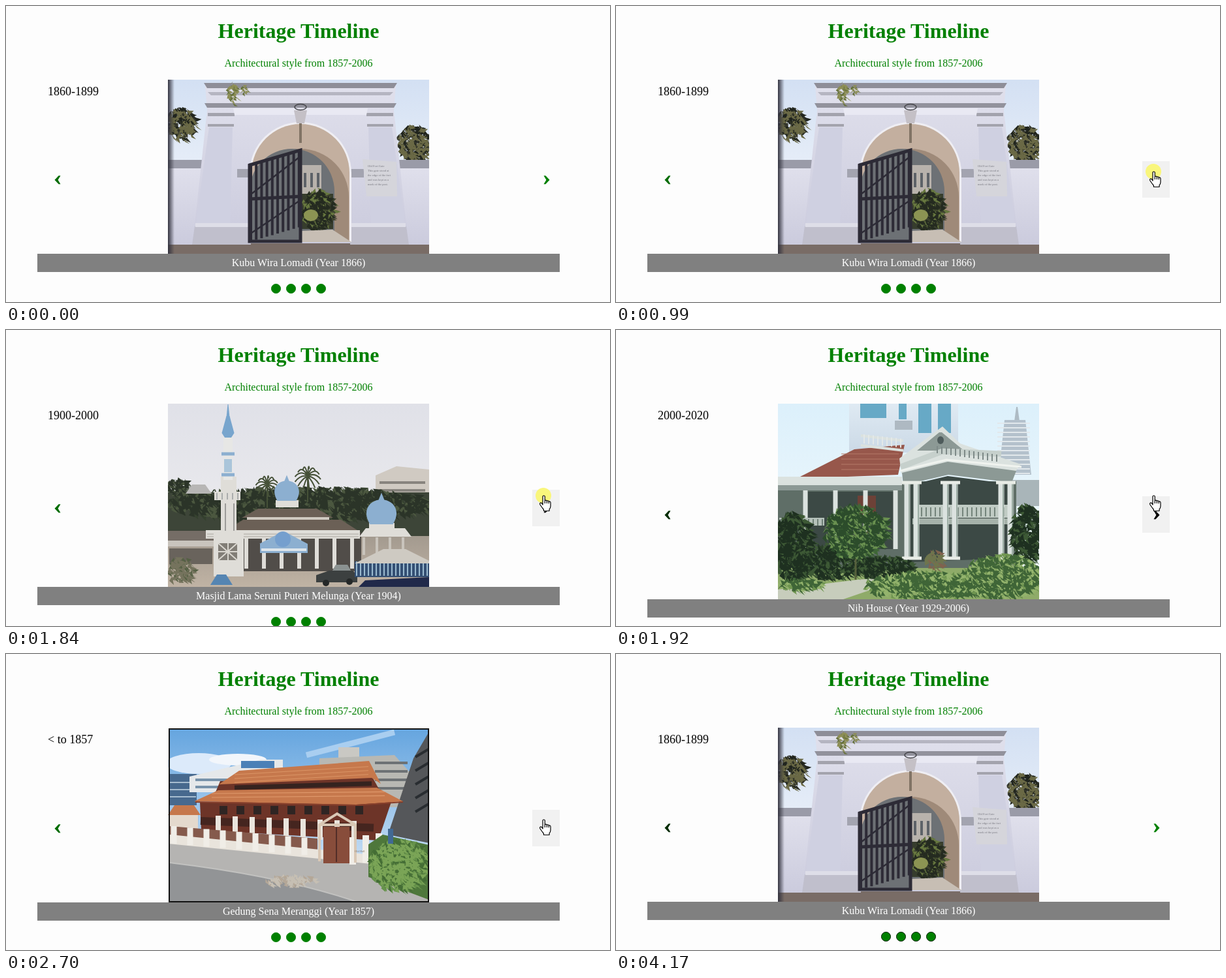
Write an HTML page that moves like this. It is 925 by 454 pixels and loops after 4400 ms.

```html
<!DOCTYPE html>
<html lang="en">
<head>
<meta charset="utf-8">
<title>Heritage Timeline</title>
<style>
  html, body { margin: 0; width: 100%; height: 100%; overflow: hidden; background: #fdfdfd; }
  svg { display: block; width: 925px; height: 454px; }
  text { font-family: "Liberation Serif", "Times New Roman", serif; font-size: 16px; }
  .mid { text-anchor: middle; }
</style>
</head>
<body>
<svg id="stage" viewBox="0 0 925 454"></svg>
<script>
const LOOP = 4400, FIRST_TICK = 124, TICK = 77.8;
const GREEN = '#008000', PHOTO = { x: 248, y: 113, w: 400 };

let seed = 7;
const rand = () => (seed = (seed * 16807) % 2147483647) / 2147483647;
const spread = r => ((rand() * 2 - 1) * r).toFixed(1);
const clamp = v => Math.max(0, Math.min(1, v));
const repeat = (n, fn) => Array.from({ length: n }, (_, i) => fn(i)).join('');

const shape = (fill, d) => `<path fill="${fill}" d="${d}"/>`;
const poly = (fill, points) => `<polygon fill="${fill}" points="${points}"/>`;
const rect = (fill, x, y, w, h) => `<rect fill="${fill}" x="${x}" y="${y}" width="${w}" height="${h}"/>`;
const line = (color, width, d) => `<path fill="none" stroke="${color}" stroke-width="${width}" d="${d}"/>`;
const oval = (fill, x, y, rx, ry = rx) => `<ellipse fill="${fill}" cx="${x}" cy="${y}" rx="${rx}" ry="${ry}"/>`;
const text = (fill, x, y, content, extra = '') => `<text fill="${fill}" x="${x}" y="${y}" ${extra}>${content}</text>`;
const gradient = (id, from, to, dir = 'x2="0" y2="1"') =>
  `<linearGradient id="${id}" ${dir}><stop stop-color="${from}"/><stop offset="1" stop-color="${to}"/></linearGradient>`;

// Symmetric block whose width runs from top to bottom.
const taper = (fill, cx, y, top, bottom, h) =>
  shape(fill, `M${cx - top / 2} ${y}h${top}L${cx + bottom / 2} ${y + h}h${-bottom}z`);
const columns = (color, width, n, x, step, y, h, slope = 0) =>
  line(color, width, repeat(n, i => `M${x + i * step} ${y + i * slope}v${h}`));
const stripes = (color, width, n, x, w, y, step, slope = 0) =>
  line(color, width, repeat(n, i => `M${x} ${y + i * step}l${w} ${w * slope}`));
const arch = (fill, cx, r, top, bottom) =>
  shape(fill, `M${cx - r} ${bottom}V${top + r}a${r} ${r} 0 0 1 ${2 * r} 0V${bottom}z`);
const dome = (fill, cx, base, r) =>
  shape(fill, `M${cx - r * .8} ${base}c${-r * .6} ${-r} 0 ${-r * 1.6} ${r * .6} ${-r * 1.7}l${r * .2} ${-r * .5}l${r * .2} ${r * .5}c${r * .6} ${r * .1} ${r * 1.2} ${r * .7} ${r * .6} ${r * 1.7}z`);

// Loose leaves scattered inside an ellipse.
function foliage(colors, x, y, rx, ry, size = 7) {
  const count = Math.round(rx * ry / size);
  return colors.map(color => shape(color, repeat(count, () => {
    const a = rand() * 2 * Math.PI, r = Math.sqrt(rand());
    const px = (x + Math.cos(a) * r * rx).toFixed(1), py = (y + Math.sin(a) * r * ry).toFixed(1);
    return `M${px} ${py}l${spread(size)} ${size}l${size} ${spread(size)}z`;
  }))).join('');
}

const palm = (color, x, y, r) => line(color, 2, `M${x} ${y}v${r * 2}` + repeat(13, i => {
  const a = i * 2 * Math.PI / 13, dx = Math.cos(a) * r, dy = Math.sin(a) * r * .8;
  return `M${x} ${y}q${dx * .6} ${dy - r * .3} ${dx} ${dy + r * .25}`;
}));

function gateway() {
  const axis = 451, leaf = ['#33352b', '#20241d', '#6a6945'], weeds = ['#66713d', '#8d8e55'];
  const half = side => `<g transform="translate(${axis}) scale(${side} 1)">`
    + rect('url(#wall)', 148, 246, 55, 120) + rect('#9a9ba8', 148, 236, 55, 13)
    + poly('url(#wall)', '0,121 146,121 143,160 165,364 0,364')
    + poly('#cfd0e1', '104,186 140,186 161,340 108,340')
    + rect('#a3a3ad', 101, 164, 41, 5) + rect('#a3a3ad', 102, 181, 40, 4)
    + rect('#a3a4b0', 74, 250, 23, 13)
    + poly('#c0bfcc', '77,338 162,338 166,366 76,366') + rect('#dedee8', 77, 333, 84, 6) + '</g>';
  const words = ['Old Fort Gate', 'This gate stood at', 'the edge of the fort', 'and was kept as a', 'mark of the past.'];
  return rect('url(#sky0)', 248, 113, 400, 267)
    + foliage(leaf, 267, 178, 22, 24) + foliage(leaf, 624, 208, 24, 28)
    + rect('#796c66', 248, 361, 400, 19)
    + half(-1) + half(1)
    + taper('#8e8e98', axis, 118, 296, 286, 8) + taper('#b5b5c1', axis, 132, 284, 274, 5)
    + taper('#92929c', axis, 149, 294, 286, 7) + taper('#e9e9f3', axis, 157, 206, 202, 10)
    + arch('#efeef3', axis, 78, 178, 362) + arch('#c3af9f', axis, 75, 181, 362)
    + arch('#9f8a79', 451, 74, 219, 362) + arch('#6d7175', 438, 65, 219, 361)
    + rect('#b8b2ac', 452, 244, 31, 44) + columns('#5d6268', 4, 3, 458, 10, 256, 22)
    + rect('#363c2d', 452, 288, 49, 54) + foliage(['#3e432e', '#67783f', '#252b20'], 476, 308, 24, 30)
    + oval('#8c9453', 467, 321, 11, 9)
    + poly('#c7beb4', '451,345 500,343 529,362 451,362')
    + columns('#2d2b36', 4, 10, 375, 8.2, 244, 117, -2.4)
    + line('#2d2b36', 5, 'M373 244L451 221V361H373zM373 296L451 292')
    + line('#2d2b36', 2.5, 'M376 288L449 232M376 348L449 299')
    + taper('#c4c0c6', axis, 160, 20, 12, 20) + rect('#817465', 449, 180, 4, 30)
    + '<ellipse cx="451" cy="155" rx="9" ry="4.5" fill="none" stroke="#45454a" stroke-width="1.5"/>'
    + poly('#d5d5db', '546,235 598,239 599,292 552,292')
    + words.map((w, i) => text('#77777f', 554, 247 + i * 7, w, 'style="font-size:4.6px"')).join('')
    + foliage(weeds, 346, 132, 7, 17, 5) + foliage(weeds, 365, 126, 5, 6, 4)
    + rect('url(#edge)', 248, 113, 10, 267);
}

function mosque() {
  const white = '#dfddd8', blue = '#8cafd0', roof = '#6b6056', leaf = ['#35412f', '#4b573f', '#2b3428'];
  const minaret = 340;
  return rect('url(#sky1)', 248, 113, 400, 281)
    + poly('#d0cac2', '566,223 598,209 648,214 648,260 566,255') + stripes('#88847e', 4, 2, 572, 70, 234, 12)
    + rect('#3d4538', 248, 249, 400, 72) + foliage(leaf, 448, 262, 200, 24, 9) + foliage(leaf, 264, 238, 18, 12)
    + taper('#b7b6b5', 295, 237, 20, 40, 14)
    + palm('#465138', 400, 237, 18) + palm('#465138', 462, 224, 20)
    + rect('url(#ground)', 248, 316, 400, 78)
    + rect('#756d66', 248, 308, 71, 15) + rect('#c9c4bd', 248, 323, 71, 9) + rect('#69635c', 250, 335, 66, 24)
    + rect('#514d49', 360, 310, 184, 60)
    + taper(roof, 431, 274, 90, 140, 14) + rect('#cfcac1', 369, 287, 126, 4) + taper(roof, 438, 291, 150, 200, 16)
    + rect(white, 306, 307, 236, 13) + stripes('#aaa69f', 1, 2, 308, 232, 313, 4)
    + rect(white, 413, 261, 35, 11) + dome(blue, 430, 262, 18)
    + columns(white, 6, 7, 368, 27, 320, 46)
    + taper(blue, 425, 311, 10, 74, 17) + rect(blue, 389, 328, 73, 14) + rect('#dee5eb', 391, 335, 69, 4)
    + oval('#759fce', 424, 321, 12)
    + taper(white, 581, 304, 60, 80, 13) + columns('#c9c4bc', 4, 4, 548, 20, 318, 27)
    + rect(white, 556, 296, 39, 9) + dome(blue, 575, 298, 22)
    + rect(white, 318, 310, 46, 68) + rect('#817d76', 325, 327, 29, 26) + line('#dad7d0', 2, 'M325 340h29M340 327v26M325 327l29 26M354 327l-29 26')
    + rect(white, minaret - 11, 225, 24, 85) + columns('#9d9c99', 2, 2, 336, 13, 266, 42)
    + rect(white, 319, 248, 40, 13) + columns('#9b9d9f', 1.5, 5, 323, 8, 250, 10)
    + rect('#e7e7e5', minaret - 7, 160, 14, 70) + rect('#aac5da', minaret - 6, 198, 12, 20)
    + stripes(blue, 5, 2, minaret - 10, 20, 190, 32)
    + taper('#78a5cd', minaret, 114, 1, 5, 20) + taper('#78a5cd', minaret, 132, 5, 19, 26) + taper('#78a5cd', minaret, 158, 19, 10, 7)
    + taper('#5585b2', 330, 375, 14, 34, 16) + foliage(['#556044', '#75735d'], 267, 364, 20, 18)
    + taper('#8b9291', 514, 360, 18, 34, 14) + shape('#3c4040', 'M475 387v-11l20 -7h36l7 7v11z')
    + oval('#252828', 490, 388, 5) + oval('#252828', 526, 386, 5)
    + rect('#344f73', 534, 355, 114, 24) + columns('#9bbbd0', 2, 19, 537, 6, 355, 22)
    + taper('#cecac2', 595, 336, 34, 122, 22) + poly('#20294a', '540,394 550,384 648,379 648,394');
}

function villa() {
  const white = '#dbe2df', shade = '#8c9995', dark = '#3c4945', glass = '#67a9c6';
  const deep = ['#2b4029', '#3d5935', '#1e3020'], bright = ['#6f9550', '#94b46d', '#3f6537'], mid = ['#3f6637', '#6a9150', '#2c4c2b'];
  const pair = x => columns(white, 9, 2, x - 7, 14, 232, 118) + columns('#9cada4', 2, 2, x - 4, 14, 234, 116)
    + stripes('#e8ece6', 5, 2, x - 15, 30, 234, 116);
  return rect('url(#sky2)', 248, 113, 400, 300)
    + rect('url(#tower)', 357, 113, 167, 75)
    + rect(glass, 374, 113, 40, 22) + rect(glass, 433, 113, 12, 24) + columns(glass, 20, 2, 473, 30, 113, 45)
    + rect('#aeb9c2', 427, 139, 27, 14)
    + taper('#aebbc4', 614, 118, 2, 8, 22) + taper('#b4c1cc', 611, 138, 32, 50, 84)
    + stripes('#e2e8ec', 2, 12, 584, 50, 143, 7) + rect('#a9b5b9', 606, 230, 42, 40)
    + rect('#5f6e67', 248, 232, 365, 135)
    + poly('#97574b', '276,228 365,183 442,176 432,222') + stripes('#b47a68', 1, 4, 345, 88, 190, 8)
    + stripes(white, 4, 2, 375, 65, 162, 15, .12) + columns('#e3e8e8', 2, 9, 380, 7, 160, 14, .8)
    + rect(white, 248, 225, 190, 13) + rect(shade, 248, 238, 190, 8)
    + rect(dark, 294, 248, 137, 88) + rect('#6d4137', 370, 254, 28, 36)
    + columns(white, 7, 4, 290, 46, 246, 90) + rect('#b5c1ba', 250, 288, 69, 12) + columns('#6f8077', 2, 10, 253, 7, 290, 10)
    + poly(white, '434,197 500,148 527,174 620,206 611,218 508,203 437,220')
    + taper(shade, 497, 157, 4, 72, 28) + oval('#4e5b5b', 497, 169, 5, 6)
    + line('#c6d0cc', 9, 'M436 210L500 186L590 190') + columns('#7e8a88', 2, 14, 492, 7, 178, 11, 1)
    + poly(shade, '438,219 508,202 613,216 606,234 509,222 440,238') + line('#f0f3ef', 3, 'M435 216L506 199L621 210')
    + poly(dark, '445,239 508,224 603,236 608,350 450,356')
    + rect('#c0cbc4', 457, 268, 143, 20) + columns('#74847b', 2, 20, 461, 7, 272, 14) + rect('#a6b2aa', 454, 289, 151, 9)
    + pair(453) + pair(512) + pair(597)
    + rect('#8fab69', 248, 365, 400, 48) + poly('#c7cdbc', '248,413 248,398 370,383 453,377 348,413')
    + foliage(deep, 270, 328, 30, 52, 9) + foliage(deep, 325, 352, 58, 26) + foliage(deep, 410, 362, 45, 18)
    + foliage(deep, 628, 308, 22, 44, 8) + line('#56613c', 3, 'M367 383v-90M368 336l-26 -39M368 329l29 -32')
    + foliage(mid, 366, 305, 48, 40) + foliage(['#81634d', '#6e754d'], 486, 349, 15, 13)
    + foliage(bright, 475, 388, 95, 20) + foliage(bright, 590, 374, 62, 32) + foliage(bright, 280, 387, 34, 8);
}

function hall() {
  const tile = '#c6784c', wood = '#6d3428', white = '#e9e4dc', slope = .1;
  return rect('url(#sky3)', 249, 114, 399, 267)
    + oval('#dceafa', 295, 168, 50, 16) + oval('#f2f6fb', 355, 162, 44, 9) + line('#a9cef0', 9, 'M460 155L595 120')
    + rect('#47698e', 251, 184, 41, 48) + stripes('#a7bdd0', 2, 3, 251, 40, 197, 11)
    + poly('#e5e8ea', '281,188 390,162 424,162 424,212 281,212') + stripes('#7792aa', 4, 2, 290, 50, 193, 11) + rect('#4b80b7', 360, 164, 51, 11)
    + rect('#c9c8c3', 509, 143, 32, 19) + poly('#b8b8b3', '480,160 595,155 618,181 618,235 480,235') + stripes('#6d7275', 4, 4, 565, 50, 167, 13)
    + poly('#55575a', '624,160 648,119 648,290 585,277') + stripes('#292d31', 4, 5, 627, 21, 158, 21, -.6)
    + poly(wood, '328,195 560,187 575,214 320,214') + stripes('#35231f', 7, 1, 350, 210, 205, 0, -.03)
    + poly(tile, '326,200 357,179 556,164 574,199 560,190') + stripes('#db9566', 1, 3, 350, 205, 185, 6, -.06)
    + poly(wood, '297,227 591,224 570,286 299,270') + columns('#2f2523', 12, 9, 333, 26, 233, 13) + stripes('#45251f', 12, 1, 298, 265, 256, 0, .04)
    + poly(tile, '288,226 325,209 568,205 608,226 536,231') + stripes('#df986b', 1.2, 2, 315, 265, 214, 6, -.01) + line('#873f2b', 2, 'M290 227L536 232L608 227')
    + taper(tile, 273, 232, 30, 50, 15) + rect('#e4d9cd', 250, 247, 44, 22)
    + columns(white, 8, 9, 325, 26, 248, 31, 1)
    + poly('#b5b4b2', '250,285 556,321 648,366 648,381 250,381') + shape('#929496', 'M250 320Q420 340 540 381H250z') + line('#c2c2c0', 2, 'M250 320Q420 340 540 381')
    + foliage(['#b4a797', '#c6bfb3'], 433, 345, 38, 8, 6)
    + poly('#855a4c', '250,264 477,283 477,302 250,280') + stripes(white, 14, 1, 250, 307, 284, 0, slope)
    + columns('#f0ede7', 9, 9, 257, 25, 264, 27, 2.2) + columns('#f0ede7', 10, 3, 531, 20, 281, 42, -3)
    + rect('#884d3b', 486, 265, 40, 56) + columns('#522e28', 2, 1, 506, 0, 266, 53)
    + line('#d9c8b5', 4, 'M480 318V262L507 245L535 262V320M482 262h53')
    + text('#83776d', 534, 304, 'Old Hall', 'style="font-size:4.5px"')
    + poly('#4e773b', '555,292 577,277 648,293 648,377 555,342') + foliage(['#66934b', '#446d35', '#7aa456'], 601, 320, 45, 38)
    + rect('#416994', 585, 268, 8, 23)
    + '<rect x="250" y="115" width="397" height="265" fill="none" stroke="#111" stroke-width="2"/>';
}

const slides = [
  { bottom: 380, date: '1860-1899', caption: 'Kubu Wira Lomadi (Year 1866)', art: gateway },
  { bottom: 394, date: '1900-2000', caption: 'Masjid Lama Seruni Puteri Melunga (Year 1904)', art: mosque },
  { bottom: 413, date: '2000-2020', caption: 'Nib House (Year 1929-2006)', art: villa },
  { bottom: 381, date: '&lt; to 1857', caption: 'Gedung Sena Meranggi (Year 1857)', art: hall }
];

const slideMarkup = ({ bottom, date, caption, art }, i) => `<g id="slide${i}">
  <clipPath id="clip${i}">${rect('#000', PHOTO.x, PHOTO.y, PHOTO.w, bottom - PHOTO.y)}</clipPath>
  <g clip-path="url(#clip${i})">${art()}</g>
  ${rect('#808080', 48, bottom, 800, 28)}
  ${text('#fff', 448, bottom + 19, caption, 'class="mid"')}
  ${text('#000', 64, 137, date, 'style="font-size:18px"')}</g>`;

const chevron = 'M-4.5 -6.5H-1.6L4.5 0L-1.6 6.5H-4.5L-.6 0z';
document.getElementById('stage').innerHTML = `<defs>
  ${gradient('sky0', '#d3e0f3', '#fafbfd')}${gradient('sky1', '#e0e1e8', '#f0eff0')}
  ${gradient('sky2', '#dcf0fb', '#f4fafc')}${gradient('sky3', '#65a5df', '#e2eefa')}
  ${gradient('wall', '#e0e0ec', '#cbcbdd')}${gradient('ground', '#a39a8f', '#c0b3a4')}${gradient('tower', '#dfeaf3', '#cbd9e6')}
  ${gradient('edge', '#33333f', '#33333f00', 'x2="1" y2="0"')}</defs>
  ${text(GREEN, 448, 49, 'Heritage Timeline', 'class="mid" style="font-size:32px;font-weight:bold"')}
  ${text(GREEN, 448, 93, 'Architectural style from 1857-2006', 'class="mid"')}
  ${slides.map(slideMarkup).join('')}
  <g id="dots" fill="${GREEN}">${repeat(4, i => `<circle cx="${413.5 + i * 23}" r="7"/>`)}</g>
  <path id="prev" d="${chevron}"/>
  <rect id="button" x="806" width="42" height="56" fill="#f1f1f1"/>
  <path id="next" d="${chevron}"/>
  <circle id="click" cx="823" cy="254" r="12" fill="#f9f67c"/>
  <g id="hand" fill="#fff" stroke="#000" stroke-width="1.2" stroke-linejoin="round">
    <path d="M-1 14V1.5Q-1 0 .6 0T2.3 1.5V7.5Q4 6.4 5.4 8Q7.2 7.2 8.2 8.9Q11 8.4 11 11V16Q11 19 9 21V23.5H.5V21.5Q-2 18.5 -5 14Q-6 11.7 -4.3 11Q-2.7 10.7 -1 14z"/>
    <path fill="none" d="M2.3 7.5V12M5.4 8V12M8.2 8.9V12.3"/></g>
  <path id="arrow" d="M0 0V16.5L4 13L6.6 19L9 18L6.4 12H12z" fill="#fff" stroke="#000"/>`;

const part = id => document.getElementById(id);
const [dots, prev, next, button, click, hand, arrow] =
  ['dots', 'prev', 'next', 'button', 'click', 'hand', 'arrow'].map(part);
const groups = slides.map((_, i) => part('slide' + i));
const show = (node, on) => node.setAttribute('display', on ? 'inline' : 'none');
const place = (node, x, y, extra = '') => node.setAttribute('transform', `translate(${x} ${y}) ${extra}`);

const clickTicks = [11, 12, 22, 31, 32];
const LEAVE = 43, GONE = 49;

// The pointer glides in with ease-out, rests, then leaves with ease-in.
function pointerAt(tick) {
  if (tick < 0 || tick >= GONE) return null;
  const away = (1 - clamp(tick / 5)) ** 2, out = clamp((tick - LEAVE) / 5);
  const settle = clamp((tick - 6) / 2);
  return [822 + settle - 18 * away + 20 * out, 254 + 104 * away + 150 * out * out];
}

function draw(time) {
  const tick = Math.floor((time % LOOP - FIRST_TICK) / TICK);
  const late = tick >= LEAVE;
  const current = Math.max(0, Math.floor((tick - 3) / 10)) % slides.length;
  const { bottom } = slides[current];
  const top = Math.round(bottom / 2 + 48);
  const hover = Math.min(clamp((tick - 3) / 6), clamp((52 - tick) / 7));
  groups.forEach((group, i) => show(group, i === current));

  place(dots, 0, bottom + 53.5);
  dots.setAttribute('stroke', late ? '#001800' : GREEN);
  place(prev, 79, top + 28.8, 'scale(-1 1)');
  prev.setAttribute('fill', late || current === 2 ? '#002c00' : '#006c00');
  button.setAttribute('y', top);
  button.setAttribute('opacity', hover);
  place(next, 828, top + 28.8);
  next.setAttribute('fill', `rgb(0 ${Math.round(128 * (1 - hover))} 0)`);

  show(click, clickTicks.includes(tick));
  const pointer = pointerAt(tick);
  const over = pointer && pointer[1] < top + 56;
  show(hand, over);
  show(arrow, pointer && !over);
  if (pointer) place(over ? hand : arrow, ...pointer);
}

const start = performance.now();
function frame() {
  draw(performance.now() - start);
  requestAnimationFrame(frame);
}
frame();
</script>
</body>
</html>
```
